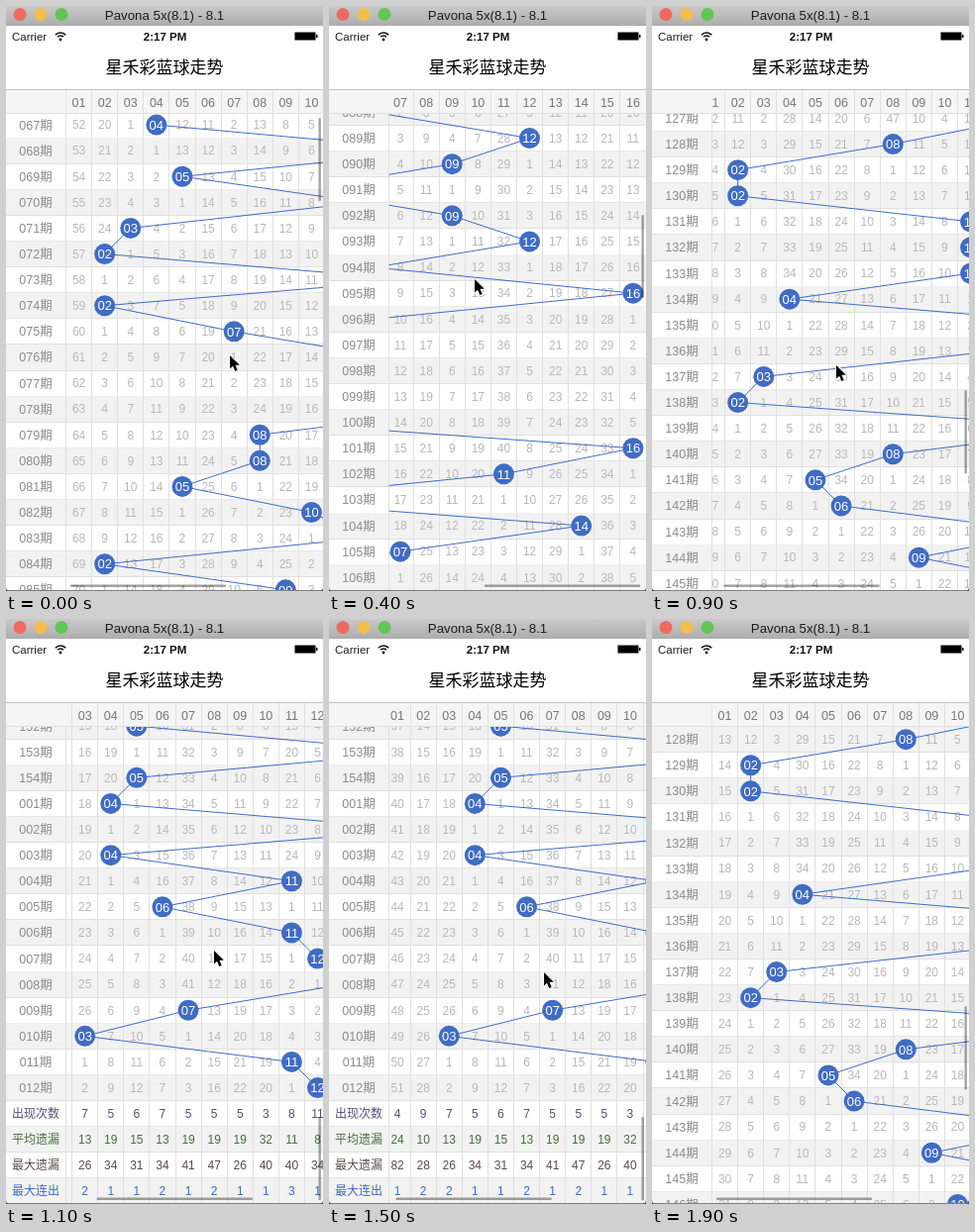
Animation, 320 px wide and 591 px high, one loop 1940 ms. Source, as an HTML page with a canvas:

```html
<!DOCTYPE html>
<html lang="zh">
<head>
<meta charset="utf-8">
<style>
  html, body { margin: 0; width: 100%; height: 100%; overflow: hidden; background: #fff; }
  canvas { display: block; }
</style>
</head>
<body>
<canvas id="stage" width="320" height="591"></canvas>
<script>
const ctx = document.getElementById('stage').getContext('2d');
const W = 320, H = 591, CELL = 26.1, LEFT = 60.5, TOP = 107, HEAD_TOP = 84.5, HEAD_END = 108.5;
const FONT = '"Liberation Sans", "Noto Sans CJK SC", "Noto Sans CJK", sans-serif';
const BLUE = '#406cc4', GRID = '#e0e0e0', BAR = 'rgba(0,0,0,.36)';
const LOOP = 1940, STEP = 100, COLS = 16;

// Winning column of each draw, periods 067-154 then 001-012.
const hits = (
  '4 15 5 12 3 2 14 2 7 13 14 16 8 8 5 10 12 2 9 7 ' +
  '6 6 12 9 3 9 12 6 16 6 3 1 4 2 16 11 1 14 7 1 ' +
  '6 2 13 16 12 15 5 11 1 2 9 12 16 13 7 15 10 3 3 12 ' +
  '13 8 2 2 11 11 11 4 16 12 3 2 16 8 5 6 14 9 14 10 ' +
  '13 12 15 8 14 5 16 5 4 16 4 11 6 11 12 13 7 3 11 12').split(' ').map(Number);
const pad = (n, size) => String(n).padStart(size, '0');
const periods = hits.map((_, i) => pad(i < 88 ? 67 + i : i - 87, 3) + '期');

// Draws since the last hit, per column; 0 marks a hit.
const misses = [];
let gaps = [51, 19, 0, 3, 11, 10, 1, 12, 7, 4, 5, 31, 7, 9, 0, 14];
for (const hit of hits) {
  gaps = gaps.map((gap, c) => c + 1 === hit ? 0 : gap + 1);
  misses.push(gaps);
}
const columns = gaps.map((_, c) => misses.map(row => row[c]));
const count = col => col.filter(v => v === 0).length;
const longestRun = col => {
  let run = 0;
  return Math.max(...col.map(v => run = v ? 0 : run + 1));
};
const stats = [
  ['出现次数', '#544e70', count],
  ['平均遗漏', '#46703c', col => Math.floor((hits.length - count(col)) / count(col))],
  ['最大遗漏', '#5f4a49', col => Math.max(...col)],
  ['最大连出', '#426bb5', longestRun]
].map(([label, color, fn]) => ({ label, color, values: columns.map(fn) }));

const rowCount = hits.length + stats.length;
const MAX_X = COLS * CELL - (W - LEFT), MAX_Y = rowCount * CELL - (H - TOP);

// step, scroll x, scroll y, pointer x, pointer y
const keys = [
  [0, 0, 0, 226, 353],
  [4, MAX_X, 560.7, 147, 276],
  [6, 5, 460.2, 205.5, 308.5],
  [9, 13, 1572.6, 186, 363],
  [11, 46.1, MAX_Y, 210, 335],
  [15, 4.5, MAX_Y, 217, 357],
  [19, 0, 1590.5, 225, 600]
];

function poseAt(step) {
  const next = Math.max(1, keys.findIndex(k => k[0] >= step));
  const a = keys[next - 1], b = keys[next];
  const p = (step - a[0]) / (b[0] - a[0]);
  return a.map((v, i) => v + (b[i] - v) * p).slice(1);
}

function text(str, x, y, size, color, weight = 400, align = 'center') {
  ctx.font = `${weight} ${size}px ${FONT}`;
  ctx.textAlign = align;
  ctx.fillStyle = color;
  ctx.fillText(str, x, y + size * 0.36);
}

function rect(x, y, w, h, color) {
  ctx.fillStyle = color;
  ctx.fillRect(x, y, w, h);
}

function disc(x, y, r, color) {
  ctx.fillStyle = color;
  ctx.beginPath();
  ctx.arc(x, y, r, 0, Math.PI * 2);
  ctx.fill();
}

function line(points, color, width = 1) {
  ctx.strokeStyle = color;
  ctx.lineWidth = width;
  ctx.beginPath();
  points.forEach(([x, y]) => ctx.lineTo(x, y));
  ctx.stroke();
}

function clipped(x, y, w, h, draw) {
  ctx.save();
  ctx.beginPath();
  ctx.rect(x, y, w, h);
  ctx.clip();
  draw();
  ctx.restore();
}

function drawTable(sx, sy) {
  const colX = c => LEFT + (c + 0.5) * CELL - sx;
  const rowY = r => TOP + (r + 0.5) * CELL - sy;
  const first = Math.max(0, Math.floor(sy / CELL) - 1);
  const last = Math.min(rowCount - 1, first + 21);
  const colLines = (y1, y2) => {
    for (let c = 0; c <= COLS; c++) {
      const x = Math.floor(LEFT + c * CELL - sx) + 0.5;
      line([[x, y1], [x, y2]], GRID);
    }
  };

  clipped(0, HEAD_END, W, H, () => {
    for (let r = first; r <= last; r++) {
      const y = rowY(r), bottom = Math.floor(y + CELL / 2) + 0.5;
      if (r % 2) rect(0, y - CELL / 2, W, CELL, '#f2f2f2');
      line([[0, bottom], [W, bottom]], GRID);
      const stat = stats[r - hits.length];
      if (stat) text(stat.label, 30, y, 12, stat.color);
      else text(periods[r], 30, y, 12.5, '#8c8c8c');
    }
    line([[LEFT, HEAD_END], [LEFT, H]], GRID);
  });

  clipped(LEFT, HEAD_END, W - LEFT, H, () => {
    colLines(HEAD_END, H);
    for (let r = first; r <= last; r++) {
      const stat = stats[r - hits.length];
      (stat ? stat.values : misses[r]).forEach((v, c) => {
        if (v) text(v, colX(c), rowY(r), 12, stat ? stat.color : '#b8b8b8');
      });
    }
    line(hits.map((hit, r) => [colX(hit - 1), rowY(r)]), BLUE);
    for (let r = first; r <= Math.min(last, hits.length - 1); r++) {
      const x = colX(hits[r] - 1), y = rowY(r);
      disc(x, y, 10.5, BLUE);
      text(pad(hits[r], 2), x, y, 13, '#fff');
    }
  });

  rect(0, HEAD_TOP, W, HEAD_END - HEAD_TOP, '#f5f5f5');
  clipped(LEFT, HEAD_TOP, W - LEFT, HEAD_END - HEAD_TOP, () => {
    colLines(HEAD_TOP, HEAD_END);
    for (let c = 0; c < COLS; c++) text(pad(c + 1, 2), colX(c), 97, 12.5, '#777');
  });
  line([[0, HEAD_TOP], [W, HEAD_TOP]], '#c4c4c4');
  line([[0, HEAD_END], [W, HEAD_END]], GRID);

  ctx.lineCap = 'round';
  const barX = 66 + sx * 0.582, barY = 114 + sy * 0.175;
  line([[barX, 585.7], [barX + 155, 585.7]], BAR, 2.4);
  line([[316.7, barY], [316.7, Math.min(barY + 82, 586)]], BAR, 2.4);
  ctx.lineCap = 'butt';
}

function drawChrome() {
  const shade = ctx.createLinearGradient(0, 0, 0, 20);
  shade.addColorStop(0, '#c9c9c9');
  shade.addColorStop(1, '#adadad');
  rect(0, 0, W, 20, shade);
  ['#ee6a5f', '#f4bd4c', '#61c653'].forEach((color, i) => disc(14 + i * 21, 8.5, 6.5, color));
  text('Pavona 5x(8.1) - 8.1', 160, 9, 13.3, '#1c1c1c');

  text('Carrier', 6, 30.5, 11.5, '#222', 400, 'left');
  disc(55, 34, 1.4, '#111');
  ctx.strokeStyle = '#111';
  ctx.lineWidth = 1.6;
  for (const r of [4, 7]) {
    ctx.beginPath();
    ctx.arc(55, 34, r, -Math.PI * 0.76, -Math.PI * 0.24);
    ctx.stroke();
  }
  text('2:17 PM', 160.5, 30.5, 11.5, '#111', 700);
  rect(291.5, 26.5, 21, 8, '#000');
  rect(313, 29, 1.5, 3, '#000');
  text('星禾彩蓝球走势', 160, 61.5, 17, '#000', 500);

  // Window edge with rounded lower corners.
  rect(0, H - 1, W, 1, '#808080');
  ctx.fillStyle = '#444';
  for (const [x, dir] of [[0, 1], [W, -1]]) {
    ctx.beginPath();
    ctx.moveTo(x, H - 4);
    ctx.quadraticCurveTo(x, H, x + 4 * dir, H);
    ctx.lineTo(x, H);
    ctx.fill();
  }
}

function drawPointer(x, y) {
  const shape = [[0, 0], [0, 13.6], [3.1, 10.7], [5.3, 16], [7.7, 15], [5.5, 9.8], [9.8, 9.8]];
  ctx.beginPath();
  shape.forEach(([dx, dy]) => ctx.lineTo(x + dx, y + dy));
  ctx.closePath();
  ctx.lineJoin = 'round';
  ctx.strokeStyle = '#fff';
  ctx.lineWidth = 2;
  ctx.stroke();
  ctx.fillStyle = '#000';
  ctx.fill();
  ctx.lineJoin = 'miter';
}

function render() {
  const step = Math.floor((performance.now() % LOOP) / STEP);
  const [sx, sy, px, py] = poseAt(step);
  rect(0, 0, W, H, '#fff');
  drawTable(sx, sy);
  drawPointer(px, py);
  drawChrome();
  requestAnimationFrame(render);
}
render();
</script>
</body>
</html>
```
